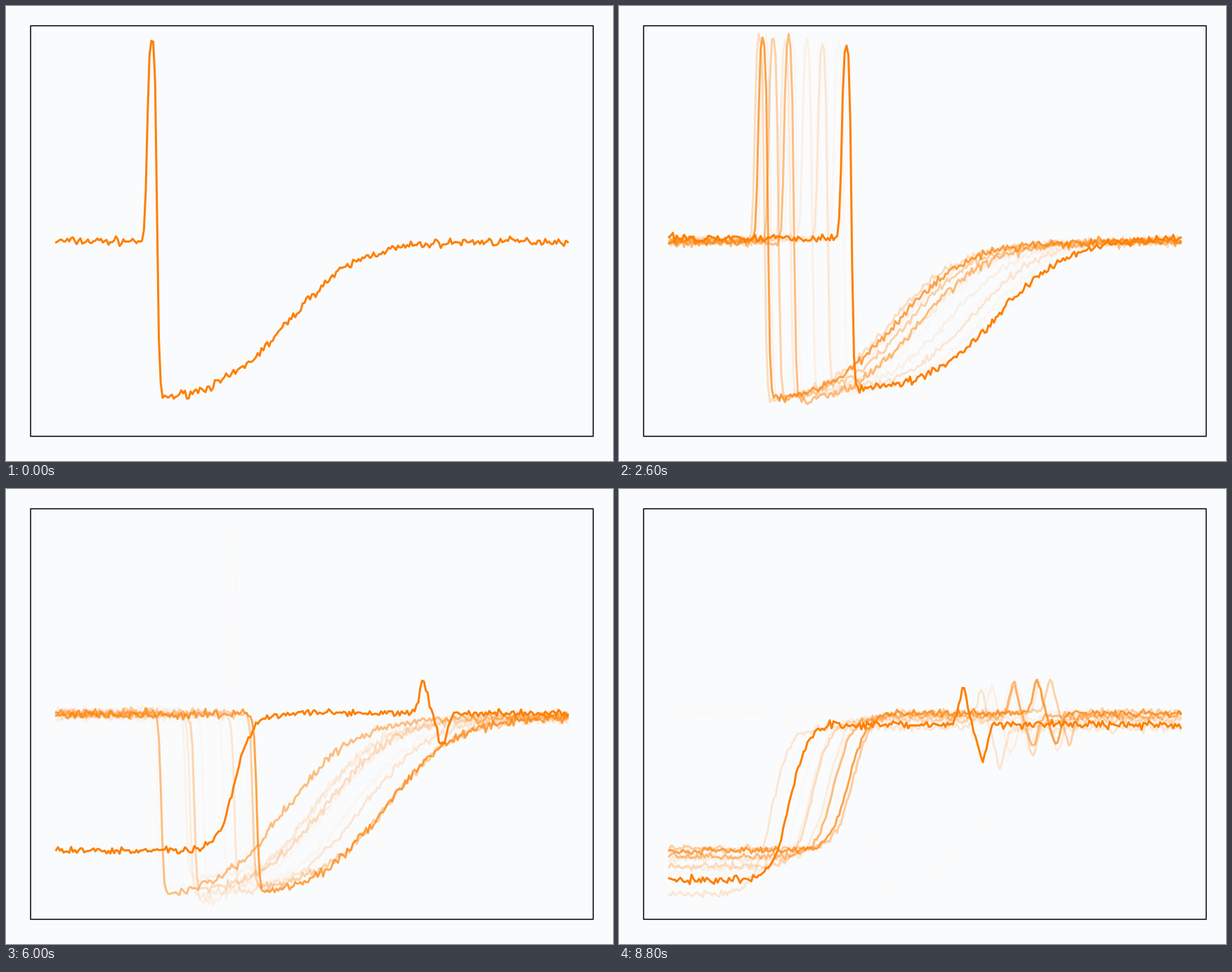
These frames come from a looping animation (864x648 px, 9 s). An HTML page with a canvas:

```html
<!DOCTYPE html>
<html lang="en">
<head>
<meta charset="utf-8">
<title>Time series</title>
<style>
  html, body { margin: 0; width: 100%; height: 100%; overflow: hidden; background: #fafbfc; }
  canvas { display: block; }
</style>
</head>
<body>
<canvas id="stage" width="864" height="648"></canvas>
<script>
const ctx = document.getElementById('stage').getContext('2d');
const POINTS = 275, LEFT = 71.4, WIDTH = 728.2;
const ZERO_Y = 388, UNIT = 90;
const STEP = 200, FADE = 0.7;

const logistic = (x, mid, scale) => 1 / (1 + Math.exp((mid - x) / scale));
const bump = (x, mid, width) => Math.exp(-(((x - mid) / width) ** 2) / 2);

// Each shape takes x and two positions: its first event and its second.
const spike = (x, peak, mid) => {
  const fall = logistic(x, peak + 7, 1.5);
  return 1.3 * logistic(x, peak - 7, 1.6) * (1 - fall) - fall * (1 - logistic(x, mid, 50));
};
const drop = (x, edge, mid) => {
  const fall = logistic(x, edge, 1.8);
  return 0.015 * (1 - fall) - fall * (1 - logistic(x, mid, 50));
};
const rise = (x, mid, peak) =>
  logistic(x, mid, 12.5) + 0.23 * bump(x, peak, 6) - 0.23 * bump(x, peak + 27, 6.5);

const groups = [
  [spike, [[208, 402], [293, 490], [327, 545], [247, 445], [313, 520],
           [209, 402], [268, 470], [237, 434], [290, 503], [200, 385],
           [220, 412], [242, 425], [205, 396], [324, 540], [322, 535]]],
  [drop, [[320, 505], [282, 455], [212, 395], [345, 548], [216, 405],
          [281, 460], [310, 493], [256, 470], [268, 430], [262, 435],
          [325, 508], [268, 455], [351, 545], [221, 398], [357, 540]]],
  [rise, [[326, 594], [318, 595], [315, 597], [258, 525], [302, 557],
          [305, 561], [334, 565], [273, 531], [297, 598], [217, 515],
          [276, 562], [333, 614], [306, 562], [327, 595], [243, 490]]]
];

let seed = 7;
const random = () => (seed = (seed * 16807) % 2147483647) / 2147483647;
const noise = () => 0.026 * (random() + random() + random() - 1.5);

function makeCurve(shape, first, second) {
  const xs = Array.from({ length: POINTS }, (_, i) => LEFT + WIDTH * i / (POINTS - 1));
  const values = xs.map(x => shape(x, first, second) + noise());
  const mean = values.reduce((sum, v) => sum + v, 0) / POINTS;
  const deviation = Math.sqrt(values.reduce((sum, v) => sum + (v - mean) ** 2, 0) / POINTS);
  const path = new Path2D();
  xs.forEach((x, i) => path.lineTo(x, ZERO_Y - UNIT * (values[i] - mean) / deviation));
  return path;
}

const curves = groups.flatMap(([shape, places]) => places.map(p => makeCurve(shape, ...p)));

function draw() {
  const current = Math.floor(performance.now() / STEP) % curves.length;
  ctx.globalAlpha = 1;
  ctx.fillStyle = '#fafbfc';
  ctx.fillRect(0, 0, 864, 648);

  ctx.strokeStyle = '#ff7f00';
  ctx.lineWidth = 3;
  ctx.lineJoin = 'round';
  ctx.lineCap = 'square';
  for (let i = 0; i <= current; i++) {
    ctx.globalAlpha = FADE ** (current - i);
    ctx.stroke(curves[i]);
  }

  ctx.globalAlpha = 1;
  ctx.strokeStyle = '#000';
  ctx.lineWidth = 1.5;
  ctx.lineJoin = 'miter';
  ctx.strokeRect(35, 28.2, 800.8, 584.6);
  requestAnimationFrame(draw);
}
draw();
</script>
</body>
</html>
```
